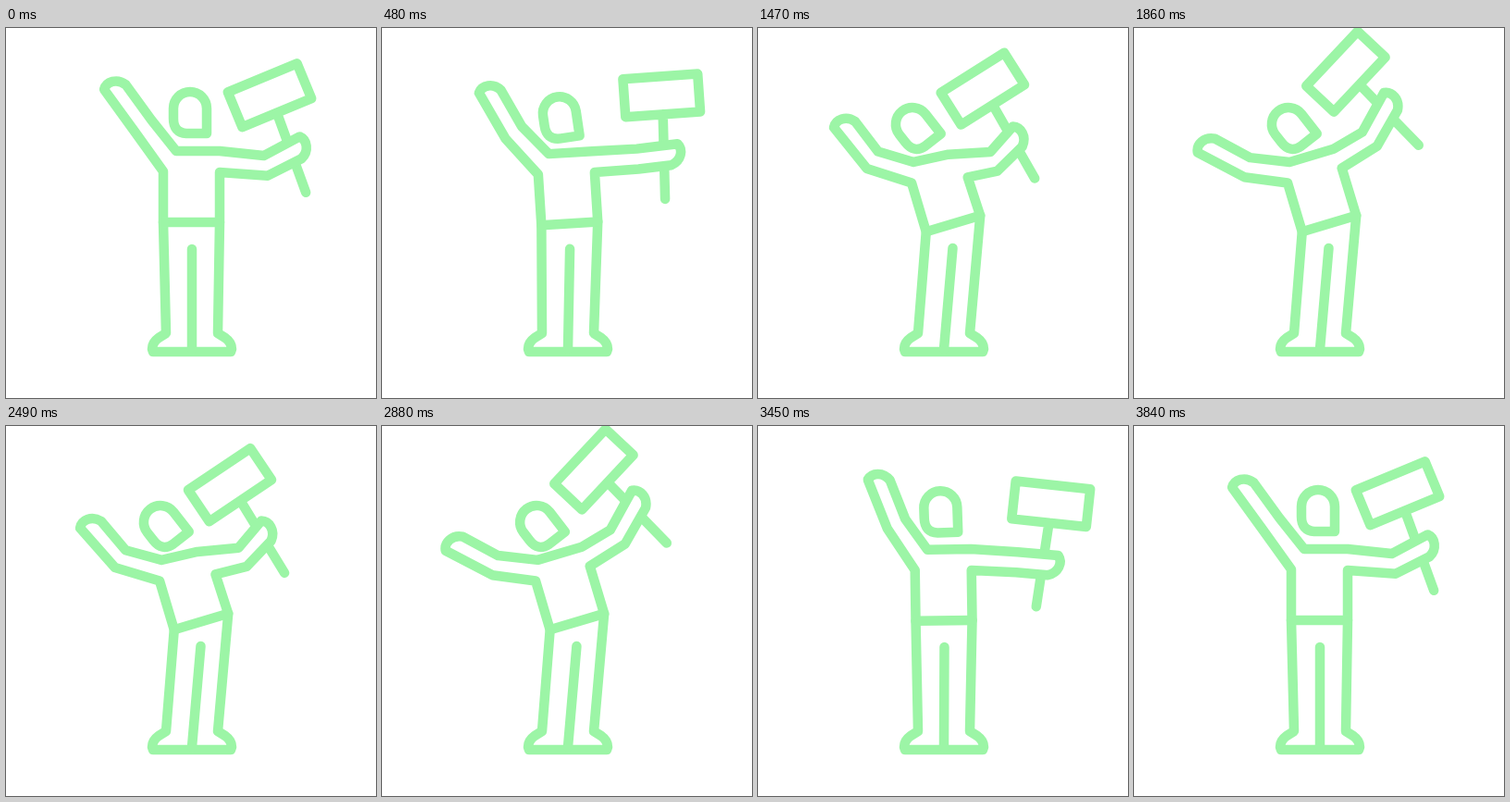
An HTML page that plays this animation: 400x400 px, repeating every 4.83 s.

```html
<!DOCTYPE html>
<html lang="en">
<head>
<meta charset="utf-8">
<title>Waving a sign</title>
<style>
  html, body { margin: 0; width: 100%; height: 100%; overflow: hidden; background: #fff; }
  svg { display: block; width: 100%; height: 100%; }
</style>
</head>
<body>
<svg viewBox="0 0 400 400" fill="none" stroke="#9cf5a6" stroke-width="10.5" stroke-linecap="round" stroke-linejoin="round">
  <path id="sign" d="M-40.5 -20.5H40.5V20.5H-40.5ZM0 20.5L-4 112"/>
  <path id="body" fill="#fff"/>
  <path id="seams"/>
  <path id="head" d="M-18 -5A18 18 0 0 1 18 -5V22H-4Q-18 21 -18 6Z"/>
</svg>
<script>
const STEP = 30, LOOP = 4830, LAST = 128, CENTRE = 63.2;

// Poses: lean, left upper arm, left forearm, right upper arm, right forearm, sign (degrees)
const low = [1, 5, 27.5, -31.5, -61.5, -47];
const high = [1, 15.3, 52, 8.7, -48, -31.7];
const poses = [
  low, high, low,
  [.39, 24.7, 43, -10, -33, -23.5],
  [.22, 46, 60, -3, -7, -4],
  [.03, 56, 69, 4, 6, 7],
  [0, 53, 54, 5, -28, -22.5]
];
// Steps away from the centre of the motion, which runs there and back
const times = [0, 16, 32, 42.9, 47.2, 53.2];

const $ = id => document.getElementById(id);
const mix = (a, b, k) => a + (b - a) * k;

function at([ox, oy], deg, x, y) {
  const a = deg * Math.PI / 180, c = Math.cos(a), s = Math.sin(a);
  return [ox + x * c - y * s, oy + x * s + y * c];
}
const text = p => p.map(v => v.toFixed(2)).join(' ');
const line = (...points) => points.map(text).join('L');

// Monotone cubic through the poses: flat at turning points
function poseAt(step) {
  const d = Math.abs(step - CENTRE);
  const ts = [...times, step < CENTRE ? CENTRE : LAST - CENTRE];
  let i = 0;
  while (i < ts.length - 2 && d > ts[i + 1]) i++;
  const h = ts[i + 1] - ts[i], k = (d - ts[i]) / h;
  return low.map((_, c) => {
    const rate = j => (poses[j + 1][c] - poses[j][c]) / (ts[j + 1] - ts[j]);
    const slope = j => {
      if (j === 0 || j === ts.length - 1) return 0;
      const a = rate(j - 1), b = rate(j);
      return a * b > 0 ? 2 * a * b / (a + b) : 0;
    };
    const a = poses[i][c], b = poses[i + 1][c], q = k * k;
    return mix(a, b, q * (3 - 2 * k)) +
      h * (slope(i) * k * (1 - k) * (1 - k) - slope(i + 1) * q * (1 - k));
  });
}

function arm(shoulder, upper, fore, length, reach) {
  const elbow = at(shoulder, upper, length, 0);
  const bend = (upper + fore) / 2;
  const near = at(elbow, bend, 0, -11), far = at(elbow, bend, 0, 11);
  const hand = (x, y) => at(near, fore, x, y);
  const curve = [hand(reach + 5.5, 7), hand(reach + 2, 18.5), hand(reach - 9.5, 22)];
  return {
    path: line(near, hand(reach, 0)) + 'C' + curve.map(text).join(' ') + 'L' + text(far),
    hand
  };
}

function draw(ms) {
  const step = Math.min(LAST, Math.floor(ms % LOOP / STEP));
  const [lean, ul, vl, ur, vr, tilt] = poseAt(step);
  const dip = lean * (1 - lean);
  const waist = [200.5 + 10.5 * lean, 210 + 1.5 * lean + 6 * dip];
  const torso = (x, y, dx = 0, dy = 0) => {
    const p = at(waist, -16.6 * lean, x, y);
    return [p[0] + dx, p[1] + dy];
  };
  // The right side slackens and its arm shortens as that arm drops during a lean
  const sag = (ur + 29) * lean * lean * .26;
  const left = arm(torso(-23.5, -66), 180 + ul, 180 + vl, 47.5, 57);
  const right = arm(torso(30.5, -65.5), ur, vr,
    50 - 11.5 * lean - .5 * sag, 44 + 4 * lean - 1.2 * sag);
  const grip = right.hand(28 + 2 * lean - .5 * sag, 10.8 + 5.2 * lean - .5 * sag);
  const hipL = torso(-30.5, 0), hipR = torso(30.5, 0);

  $('body').setAttribute('d', 'M173 330L' + [
    line(hipL, torso(-30.5, -55)),
    left.path,
    line(torso(-16.5, -77, -5 * lean, 2.5 * lean),
         torso(30.5, -77, -3 * lean - sag, 2 * lean + .6 * sag)),
    right.path,
    line(torso(30.5, -54, .2 * sag, lean + sag), hipR)
  ].join('L') + 'L229 330L237 335Q244 340 244 347L243 350H159L158 347Q158 340 165 335Z');

  $('seams').setAttribute('d',
    `M${line(hipL, hipR)}M${line([201 + 9.5 * lean, 239 - lean], [201, 347])}`);

  $('head').setAttribute('transform',
    `translate(${mix(199, 170, lean)} ${mix(92, 108, lean) + 10 * dip}) rotate(${-38 * lean})`);

  $('sign').setAttribute('transform',
    `translate(${text(at(grip, tilt, 2, -66))}) rotate(${tilt})`);
}

const start = performance.now();
function tick() {
  draw(performance.now() - start);
  requestAnimationFrame(tick);
}
tick();
</script>
</body>
</html>
```
